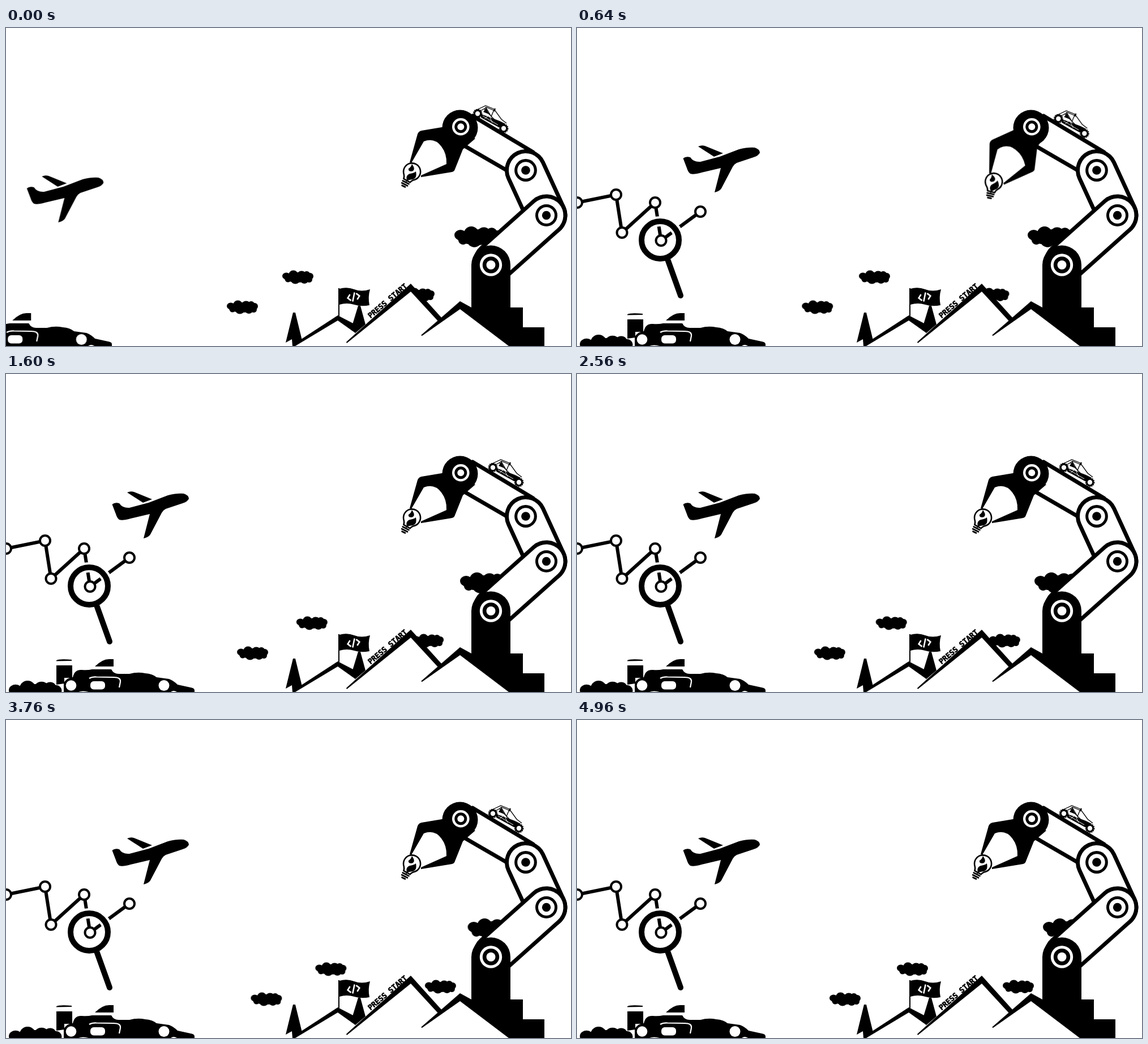
An HTML page without scripts for the animation above (5000 ms loop, 998 by 561 pixels).

```html
<!DOCTYPE html>
<html lang="en">
<head>
<meta charset="utf-8">
<title>Robot arm landscape</title>
<style>
  html, body { margin: 0; width: 100%; height: 100%; overflow: hidden; background: #fff; }
  svg { display: block; width: 998px; height: 561px; }
  .w { fill: #fff; }
  .line { fill: none; stroke: #000; }
  .white-line { fill: none; stroke: #fff; }
  .outlined { fill: #fff; stroke: #000; stroke-linejoin: round; }
  .limb { stroke-linecap: round; fill: none; }
  text { font: bold 13px "DejaVu Sans Mono", monospace; stroke: #000; stroke-width: .6px; }

  .cloud, .plane, .car, .buggy, .gripper, .chart, .smoke {
    animation: 5s linear infinite;
  }
  .cloud { animation-name: drift; }
  .plane { animation-name: fly; }
  .car { animation-name: drive; }
  .buggy { animation-name: roll; }
  .gripper { animation-name: swing; transform-origin: 795px 189px; }
  .chart { animation-name: fade; }
  .smoke { animation-name: puff; animation-timing-function: step-end; }

  @keyframes drift { to { transform: translateX(var(--d)); } }
  @keyframes fly { 0% { transform: translate(-151px, 53px); } 12%, 100% { transform: none; } }
  @keyframes drive { 0% { transform: translateX(-146px); } 12.8%, 100% { transform: none; } }
  @keyframes roll { 0% { transform: translate(-27px, -14px); } 20%, 100% { transform: none; } }
  @keyframes swing { 0%, 19.6%, 100% { transform: rotate(0deg); } 9.8% { transform: rotate(-21.5deg); } }
  @keyframes fade { 0%, 5.4% { opacity: 0; } 12%, 100% { opacity: 1; } }
  @keyframes puff { 0% { visibility: hidden; } 12.4%, 100% { visibility: visible; } }
</style>
</head>
<body>
<svg viewBox="0 0 998 561">
  <defs>
    <g id="cloud">
      <ellipse cx="27.5" cy="12.500" rx="25" ry="9"/>
      <ellipse cx="7" cy="10" rx="7" ry="6"/>
      <circle cx="10" cy="15.500" r="5.500"/>
      <circle cx="19.500" cy="8.500" r="8.500"/>
      <ellipse cx="23" cy="17" rx="8" ry="7"/>
      <circle cx="34" cy="9.500" r="8.500"/>
      <ellipse cx="39" cy="17.500" rx="7" ry="6"/>
      <circle cx="43" cy="8" r="6.500"/>
      <circle cx="47.500" cy="16" r="5.500"/>
      <ellipse cx="49" cy="10.500" rx="6" ry="6"/>
    </g>
    <g id="hub">
      <circle r="19.5"/>
      <circle r="14.5" class="w"/>
      <circle r="7.7"/>
    </g>
    <circle id="node" r="9" class="outlined" stroke-width="4"/>
    <g id="wheel">
      <circle r="7.2"/>
      <circle r="7.6" class="line" stroke-width="1.6" stroke-dasharray="2.2 1.4"/>
      <circle r="4.2" class="w"/>
    </g>
  </defs>

  <!-- clouds -->
  <g class="cloud" style="--d:56.4px"><use href="#cloud" x="390" y="480.5"/></g>
  <g class="cloud" style="--d:77.6px"><use href="#cloud" x="488" y="427.5"/></g>
  <g class="cloud" style="--d:50.4px"><use href="#cloud" x="702" y="458.5"/></g>
  <g class="cloud" style="--d:31.3px"><use href="#cloud" transform="translate(792 350) scale(1.53)"/></g>

  <!-- mountains and trees -->
  <path class="w" d="M601 556L715 455L767 516L700 561Z"/>
  <path d="M507 502H511L523 551L506 561L505 549L494 555Z"/>
  <path d="M506 561L507 558L523 548L586 507L613 521L634 523L617 538L586 516L511 561Z"/>
  <path d="M622 490H626L635 523L617 538L612 523Z"/>
  <path d="M601 554L715 451L771 513L763 517L715 465L602 556Z"/>
  <text transform="translate(644 512.500) rotate(-40.3)">PRESS START</text>

  <!-- flag -->
  <path d="M587 459H589V509H587Z"/>
  <path d="M589 460Q602 456 615 461T643 461Q639 475 642 489Q628 492 615 488T589 488Z"/>
  <path class="white-line" stroke-width="2.6" transform="translate(614 474.500) rotate(-10)" d="M-5.500 -5.500L-10.500 0L-5.500 5.500M5.500 -5.500L10.500 0L5.500 5.500M3 -7.500L-3 7.500"/>

  <!-- arm -->
  <path class="outlined" stroke-width="7" d="M824 155L931 219L886 252L810 208Z"/>
  <path class="limb" stroke="#000" stroke-width="74" d="M918 251L954.5 330.5"/>
  <path class="limb" stroke="#fff" stroke-width="60" d="M918 251L954.5 330.5"/>
  <path class="limb" stroke="#000" stroke-width="74" d="M862 413L954.5 330.5"/>
  <path class="limb" stroke="#fff" stroke-width="60" d="M862 413L954.5 330.5"/>
  <use href="#hub" transform="translate(918 251) scale(1.02)"/>
  <use href="#hub" x="954.5" y="330.5"/>
  <path d="M822 418V493L802 482L733 542L735 543L802 496L888 561H951V528H913V493H891V418A34.5 34.5 0 0 0 822 418Z"/>
  <g transform="translate(856.5 418)">
    <circle r="19.7" class="w"/><circle r="14.7"/><circle r="8" class="w"/>
  </g>

  <!-- gripper and bulb -->
  <g class="gripper">
    <path d="M776 174L734 181Q729 182 727 187L713 237L716 238L738 200Q757 193 769 209Q779 222 778 240L733 260V263L788 254Q792 253 793 249L807 214L829 195Z"/>
    <g transform="translate(717 253.5) rotate(30)">
      <path class="outlined" stroke-width="2.6" d="M-6.5 18Q-7 14 -11.5 9.5A15 15 0 1 1 11.5 9.5Q7 14 6.5 18Z"/>
      <path class="line" stroke-width="2.8" stroke-linecap="round" d="M-6 22L6 21.5M-5.5 26L5.5 25.5M-3 29.7L3 29.3"/>
    </g>
    <path d="M717 240Q724 249 718 252.500Q710 254 711 248Q715 246 717 240Z"/>
    <path d="M724 253Q727 267 715 267.500L708 269Q705 258 716 256.500Q721 256 724 253Z"/>
    <path class="line" stroke-width="1.5" d="M712 264L706 272"/>
  </g>
  <circle cx="802" cy="176" r="31.5"/>
  <g transform="translate(803.3 174.3)">
    <circle r="15.3" class="w"/><circle r="11"/><circle r="6" class="w"/>
  </g>

  <!-- buggy -->
  <g class="buggy">
    <path class="w" d="M856 161L874 151L889 157L902 175L910 183L900 189L866 172Z"/>
    <path d="M866 166L878 170L899 178L909 183L899 190L866 172Z"/>
    <path d="M875 155L880 166L870 162Z"/>
    <path class="line" stroke-width="1.3" d="M855 160L874 151L889 157L902 175L911 182M874 153L884 170L889 158M860 163L876 154L888 159M872 157L891 177"/>
    <path class="line" stroke-width="2.2" d="M889 161L891 156"/>
    <path class="white-line" stroke-width=".9" d="M869 169L896 185M872 174L880 168L886 181"/>
    <use href="#wheel" x="860" y="165"/>
    <use href="#wheel" x="906" y="191"/>
  </g>

  <!-- chart with magnifier -->
  <g class="chart">
    <path class="line" stroke-width="6" d="M0 308L69 294L79.5 361L138 308L148.5 375L218 324"/>
    <circle class="white-line" cx="147" cy="374" r="33" stroke-width="18"/>
    <circle class="line" cx="147" cy="374" r="33" stroke-width="10"/>
    <path class="line" stroke-width="10" stroke-linecap="round" d="M160 408L183 472"/>
    <use href="#node" x="0" y="308"/>
    <use href="#node" x="69" y="294"/>
    <use href="#node" x="79.5" y="361"/>
    <use href="#node" x="138" y="308"/>
    <use href="#node" x="148.5" y="375"/>
    <use href="#node" x="218" y="324"/>
  </g>

  <!-- plane -->
  <g class="plane">
    <path d="M214 209Q220 206 226 208L258 221L242 227Z"/>
    <path d="M187.500 230Q192 226 200 228Q206 237 218 236L252 227L286 214Q302 210 314 211Q323 214 323 220Q321 225 312 228L282 238Q278 240 275 245L255 283Q252 288 243 290L254 247L220 255Q206 259 200 257Q196 254 194 247Z"/>
  </g>

  <!-- car -->
  <g class="smoke"><use href="#cloud" transform="translate(5 541) scale(1.7)"/></g>
  <g class="car">
    <path d="M89 505Q95 502 116 504V506L89 506.500Z"/>
    <path d="M89 514H117V536H103V546L89 548Z"/>
    <path d="M157 516Q170 503 182 503H190V516Z"/>
    <path d="M102 561V545Q108 535 118 535Q121 521 134 522Q144 523 152 521H186Q190 529 199 529H218Q232 525 246 528Q259 529 266 535L288 538Q296 541 303 548L326 553Q333 554 333 558V561Z"/>
    <path class="white-line" stroke-width="2.2" d="M147 537Q152 534 160 534.500L190 535Q203 535 202 543L200 553"/>
    <rect class="w" x="149" y="542" width="26" height="14.500" rx="6"/>
    <circle class="w" cx="115" cy="549.500" r="9.300"/>
    <circle class="w" cx="279" cy="549.500" r="9.500"/>
    <path class="w" d="M128 561Q136 558 146 561ZM291 561Q296 557 302 561Z"/>
  </g>
</svg>
</body>
</html>
```
